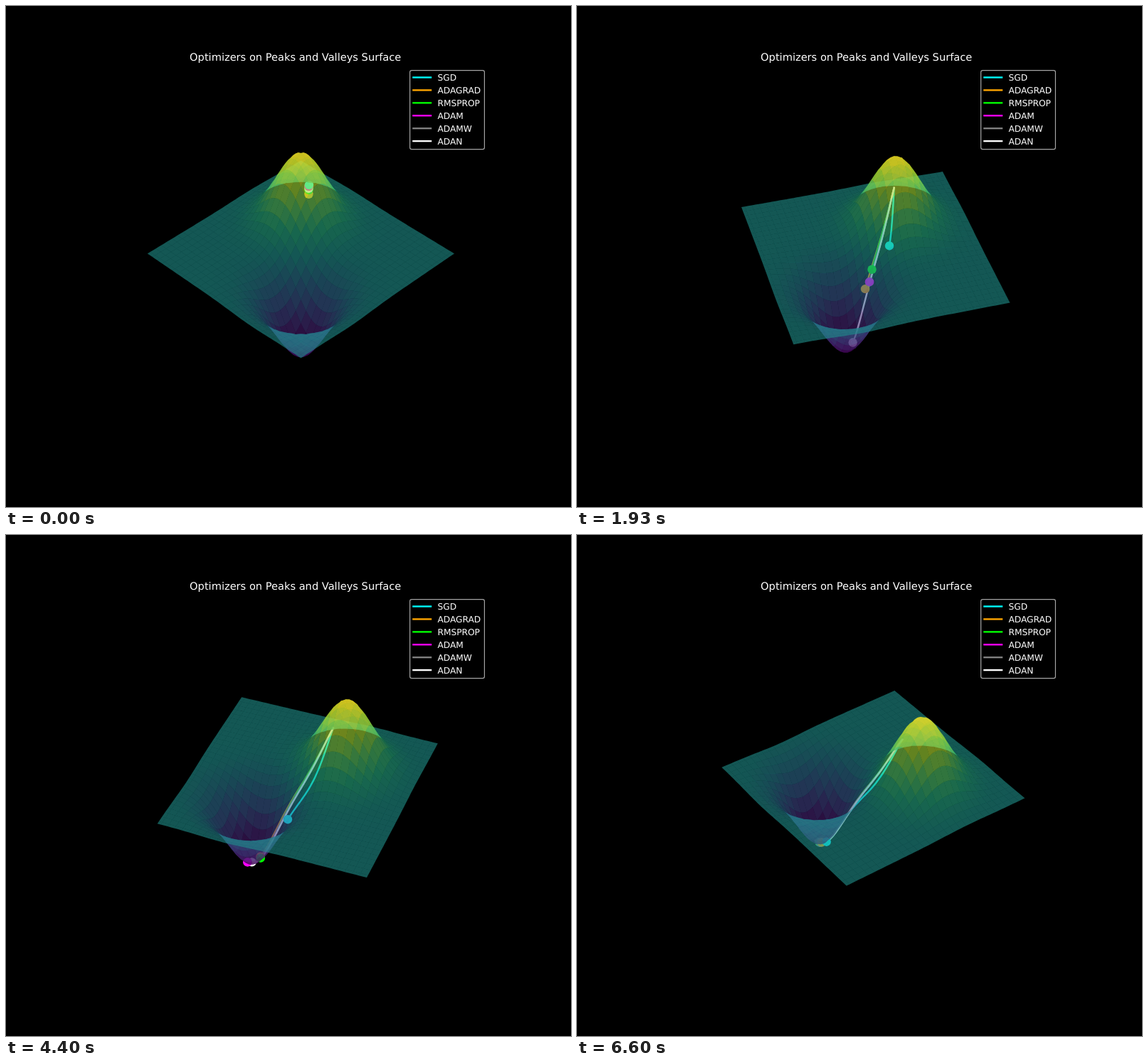
An HTML page with a canvas that plays this animation: 794x705 px, repeating every 6660 ms.

```html
<!DOCTYPE html>
<html lang="en">
<head>
<meta charset="utf-8">
<title>Optimizers on Peaks and Valleys Surface</title>
<style>
  html, body { margin: 0; width: 100%; height: 100%; overflow: hidden; background: #000; }
  canvas, svg { position: absolute; left: 0; top: 0; }
  text { font-family: "DejaVu Sans", sans-serif; font-size: 12.18px; fill: #fff; text-rendering: geometricPrecision; }
  .title { font-size: 14.62px; text-anchor: middle; }
</style>
</head>
<body>
<canvas id="plot" width="794" height="705"></canvas>
<svg id="labels" width="794" height="705">
  <text class="title" x="406.7" y="77">Optimizers on Peaks and Valleys Surface</text>
  <rect x="567.6" y="90.6" width="104.8" height="111" rx="2.6" fill="none" stroke="#a3a3a3" stroke-width="1.2"/>
</svg>
<script>
const ctx = document.getElementById('plot').getContext('2d');
const FRAMES = 100, LOOP = 6660, SIZE = 60, STRIDE = 2;

// Surface: one peak at (-1,-1), one valley at (1,1)
const bump = (x, y, c) => Math.exp(-((x - c) ** 2) - (y - c) ** 2);
const height = (x, y) => bump(x, y, -1) - bump(x, y, 1);
const gradient = ([x, y]) => {
  const peak = bump(x, y, -1), valley = bump(x, y, 1);
  return [x, y].map(v => -2 * (v + 1) * peak + 2 * (v - 1) * valley);
};

// Update rules: each returns the step for gradient g on axis a at iteration k
const sgd = lr => g => lr * g;
const adagrad = lr => {
  const sum = [0, 0];
  return (g, a) => lr * g / Math.sqrt(sum[a] += g * g);
};
const rmsprop = (lr, b) => {
  const v = [0, 0];
  return (g, a) => {
    v[a] = b * v[a] + (1 - b) * g * g;
    return lr * g / Math.sqrt(v[a] + 1e-12);
  };
};
const adam = (lr, b1, b2, decay = 0) => {
  const m = [0, 0], v = [0, 0];
  return (g, a, k, p) => {
    m[a] = b1 * m[a] + (1 - b1) * g;
    v[a] = b2 * v[a] + (1 - b2) * g * g;
    const mean = m[a] / (1 - b1 ** k), power = v[a] / (1 - b2 ** k);
    return lr * (mean / (Math.sqrt(power) + 1e-8) + decay * p);
  };
};

function descend(rule) {
  let p = [-0.8, -0.5];
  const path = [p];
  for (let k = 1; k <= FRAMES; k++) {
    const g = gradient(p);
    p = p.map((v, a) => v - rule(g[a], a, k, v));
    path.push(p);
  }
  return path.map(([x, y]) => [x, y, height(x, y)]);
}

const optimizers = [
  ['SGD', '#0ff', sgd(0.03)],
  ['ADAGRAD', '#ffa500', adagrad(0.1)],
  ['RMSPROP', '#0f0', rmsprop(0.02, 0.9)],
  ['ADAM', '#f0f', adam(0.03, 0.9, 0.999)],
  ['ADAMW', '#808080', adam(0.03, 0.9, 0.999, 0.01)],
  ['ADAN', '#fff', adam(0.05, 0.8, 0.92)]
].map(([name, color, rule]) => ({ name, color, path: descend(rule) }));

document.getElementById('labels').innerHTML += optimizers.map(({ name, color }, i) => {
  const y = 100.5 + i * 17.92;
  return `<path d="M571.2 ${y}H598.2" stroke="${color}" stroke-width="2.4"/>
    <text x="606.5" y="${y + 4.4}">${name}</text>`;
}).join('');

// Viridis colour map from a few stops
const stops = [[68, 1, 84], [71, 44, 122], [59, 82, 139], [44, 113, 142], [33, 145, 140],
  [39, 173, 129], [92, 200, 99], [170, 220, 50], [253, 231, 37]];
function viridis(t) {
  const s = t * 8, i = Math.min(7, Math.floor(s));
  return `rgb(${stops[i].map((c, k) => Math.round(c + (stops[i + 1][k] - c) * (s - i)))})`;
}

const grid = [];
for (let i = 0; i < SIZE; i++)
  for (let j = 0; j < SIZE; j++) {
    const x = -3 + j * 0.1, y = -3 + i * 0.1;
    grid.push([x, y, height(x, y)]);
  }

// Indices around the edge of each patch
const mean = list => list.reduce((a, b) => a + b, 0) / list.length;
const patches = [];
for (let i = 0; i < SIZE - 1; i += STRIDE)
  for (let j = 0; j < SIZE - 1; j += STRIDE) {
    const i1 = Math.min(i + STRIDE, SIZE - 1), j1 = Math.min(j + STRIDE, SIZE - 1), ring = [];
    const add = (r, c) => ring.push(r * SIZE + c);
    for (let c = j; c < j1; c++) add(i, c);
    for (let r = i; r < i1; r++) add(r, j1);
    for (let c = j1; c > j; c--) add(i1, c);
    for (let r = i1; r > i; r--) add(r, j);
    patches.push({ ring, level: mean(ring.map(n => grid[n][2])) });
  }
const levels = patches.map(p => p.level);
const low = Math.min(...levels), high = Math.max(...levels);
for (const p of patches) p.color = viridis((p.level - low) / (high - low));

// Perspective camera: returns screen x, screen y and nearness
const ELEV = 40 * Math.PI / 180, SIN = Math.sin(ELEV), COS = Math.cos(ELEV);
const HALF = 2.95, Z_SCALE = 0.808, DIST = 18.6, ZOOM = 152.4;
function camera(azimuth) {
  const s = Math.sin(azimuth), c = Math.cos(azimuth);
  return ([x, y, z]) => {
    const X = (x + 0.05) / HALF, Y = (y + 0.05) / HALF, Z = z * Z_SCALE;
    const side = Y * c - X * s, front = X * c + Y * s;
    const near = front * COS + Z * SIN, k = ZOOM / (1 - near / DIST);
    return [414.4 + side * k, 348.4 - (Z * COS - front * SIN) * k, near];
  };
}

function trace(points) {
  ctx.beginPath();
  for (const [x, y] of points) ctx.lineTo(x, y);
}

function draw(n) {
  const project = camera((45 + n) * Math.PI / 180);
  ctx.globalAlpha = 1;
  ctx.fillStyle = '#000';
  ctx.fillRect(0, 0, 794, 705);

  ctx.lineWidth = 2.4;
  ctx.lineJoin = 'round';
  ctx.lineCap = 'square';
  const dots = optimizers.map(({ color, path }) => {
    const points = path.slice(0, n + 2).map(project);
    trace(points);
    ctx.strokeStyle = color;
    ctx.stroke();
    return { color, at: points[points.length - 1] };
  });

  dots.sort((a, b) => a.at[2] - b.at[2]);
  for (const { color, at } of dots) {
    ctx.beginPath();
    ctx.arc(at[0], at[1], 6.2, 0, 7);
    ctx.fillStyle = color;
    ctx.fill();
  }

  // The translucent surface lies over everything, far patches first;
  // a hairline softens the seams
  const screen = grid.map(project);
  for (const p of patches) p.near = mean(p.ring.map(i => screen[i][2]));
  ctx.globalAlpha = 0.6;
  ctx.lineWidth = 0.1;
  for (const p of [...patches].sort((a, b) => a.near - b.near)) {
    trace(p.ring.map(i => screen[i]));
    ctx.closePath();
    ctx.fillStyle = ctx.strokeStyle = p.color;
    ctx.fill();
    ctx.stroke();
  }
}

let shown = -1;
const start = performance.now();
function tick() {
  const t = (performance.now() - start) % LOOP;
  // 15 frames a second, each start rounded to 10 ms
  const n = Math.floor((Math.floor(t / 10) * 3 + 1) / 20);
  if (n !== shown) draw(shown = n);
  requestAnimationFrame(tick);
}
tick();
</script>
</body>
</html>
```
